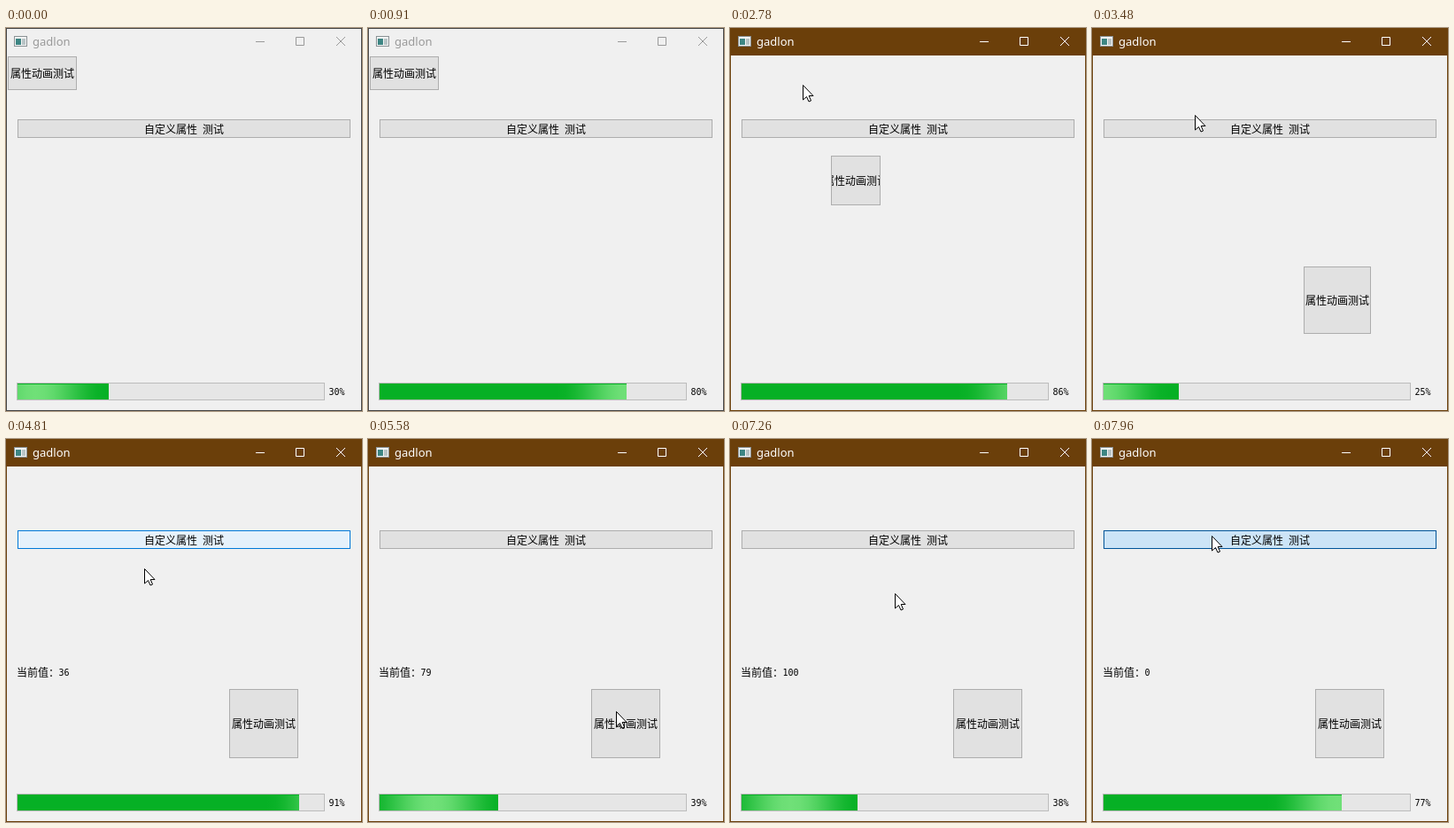
Animation of 402 by 432 pixels, one loop 8 s. Source, as an HTML page with a canvas:

```html
<!DOCTYPE html>
<html lang="zh">
<head>
<meta charset="utf-8">
<style>
  html, body { margin: 0; width: 100%; height: 100%; overflow: hidden; }
  canvas { display: block; }
</style>
</head>
<body>
<canvas id="stage" width="402" height="432"></canvas>
<script>
const ctx = document.getElementById('stage').getContext('2d');
const LOOP = 8000;
const CJK = '12px "Noto Sans CJK SC", "Noto Sans CJK", sans-serif';
const DIGITS = '10px "DejaVu Sans Mono", monospace';
const NORMAL = ['#e1e1e1', '#adadad'];
const HOVER = ['#e5f1fb', '#0078d7'];
const PRESSED = ['#cce4f7', '#005499'];
const ARROW = new Path2D('M0 0V16.5L4 13L6.5 18.5L9 17.5L6.7 12H11.5Z');

// Times at which the progress bar starts over
const passStarts = [-448, 1440, 3110, 5065, 6712, 8521];
// Stops of the mouse pointer: [time, x, y]
const pointerStops = [
  [1450, 230, 205], [1870, 74, 55], [2500, 74, 55], [3480, 116, 98], [3700, 118, 104],
  [4600, 124, 106], [4810, 156, 146], [5060, 270, 300], [6420, 302, 322], [7750, 135, 109]
];
// Mouse presses: [down, up]
const clicks = { move: [1990, 2150], count: [3850, 4000], restart: [7750, 7890] };

const clamp = (v, max = 1) => Math.max(0, Math.min(max, v));
const smooth = f => f * f * (3 - 2 * f);
const within = (t, [from, to]) => t >= from && t < to;

function stepTime(t) {
  if (t < 910) return Math.floor(t / 70) * 70;
  if (t < 1040) return 910;
  return Math.max(1040, 1730 + Math.floor((t - 1730) / 70) * 70);
}

function box(x, y, w, h, [fill, border]) {
  ctx.fillStyle = border;
  ctx.fillRect(x, y, w, h);
  ctx.fillStyle = fill;
  ctx.fillRect(x + 1, y + 1, w - 2, h - 2);
}

function text(string, x, y, font, color = '#000', align = 'left') {
  ctx.font = font;
  ctx.fillStyle = color;
  ctx.textAlign = align;
  ctx.fillText(string, x, y);
}

function button(label, x, y, w, h, colors) {
  box(x, y, w, h, colors);
  ctx.save();
  ctx.beginPath();
  ctx.rect(x + 1, y + 1, w - 2, h - 2);
  ctx.clip();
  text(label, x + w / 2, Math.round(y + h / 2) + 5, CJK, '#000', 'center');
  ctx.restore();
}

function drawWindow(active) {
  const frame = active ? '#6b3f0a' : '#444';
  const ink = active ? '#fff' : '#999';
  box(0, 0, 402, 432, ['#f0f0f0', frame]);
  if (active) ctx.fillStyle = frame;
  ctx.fillRect(1, 1, 400, 30);

  box(9, 9, 15, 12, ['#f4f4f4', '#8b9295']);
  ctx.fillStyle = '#3d8583';
  ctx.fillRect(11, 12, 6, 7);
  ctx.fillStyle = '#b8c4c6';
  ctx.fillRect(18, 12, 4, 7);
  text('gadlon', 30, 20, '13px "Noto Sans", sans-serif', ink);

  ctx.strokeStyle = ink;
  ctx.lineWidth = 1;
  ctx.stroke(new Path2D('M282 15.5h10M327.5 10.5h9v9h-9zM373 10l10 10M383 10l-10 10'));
}

// Green chunk colour, from plain (0) to fully lit (1)
const green = lit => `rgb(${6 + 106 * lit}, ${176 + 48 * lit}, ${37 + 83 * lit})`;

function drawProgress(t) {
  const pass = passStarts.findLastIndex(start => start <= t);
  const start = passStarts[pass];
  const u = (t - start) / (passStarts[pass + 1] - start);
  const value = Math.floor(100 * (1.4 * u - .4 * u * u));
  const width = clamp(Math.round(3.53 * value - 3.2), 346);

  const center = 540 * u - 95;
  const glow = ctx.createLinearGradient(center - 80, 0, center + 80, 0);
  for (let i = 0; i <= 16; i++) glow.addColorStop(i / 16, green(Math.sin(Math.PI * i / 16) ** 2));

  box(12, 400, 348, 20, ['#e6e6e6', '#bcbcbc']);
  ctx.fillStyle = green(0);
  ctx.fillRect(13, 401, width, 18);
  ctx.fillStyle = glow;
  ctx.fillRect(13, 402, width, 17);
  text(value + '%', 364.5, 414, DIGITS);
}

function drawWideButton(t) {
  const pressed = within(t, clicks.count) || t >= clicks.restart[0];
  const hover = within(t, [1520, 1640]) || within(t, [3620, 4880]);
  button('自定义属性\u2002测试', 13, 103, 376, 21, pressed ? PRESSED : hover ? HOVER : NORMAL);
}

function drawMovingButton(t) {
  const label = '属性动画测试';
  const released = clicks.move[1];
  if (t <= released) {
    button(label, 2, 32, 78, 38, t >= 1800 ? HOVER : NORMAL);
    return;
  }
  const f = clamp((t - released) / 1400);
  const offset = Math.floor(250 * f);
  const size = Math.round(38 + 40 * f);
  button(label, 2 + offset, 32 + offset, size, size, NORMAL);
}

function drawCounter(t) {
  if (t < 4150) return;
  const value = t >= clicks.restart[1] ? 0 : clamp(Math.floor((t - 4150) / 18), 100);
  text('当前值：', 12, 268, CJK);
  text(value, 59.5, 267, DIGITS);
}

function pointerAt(t) {
  const i = pointerStops.findLastIndex(stop => stop[0] <= t);
  const [from, x, y] = pointerStops[i];
  const [to, nextX, nextY] = pointerStops[i + 1] || [LOOP, x, y];
  const f = smooth((t - from) / (to - from));
  return [Math.round(x + (nextX - x) * f), Math.round(y + (nextY - y) * f)];
}

function drawPointer(t) {
  if (t < pointerStops[0][0]) return;
  const [x, y] = pointerAt(t);
  if (Object.values(clicks).some(click => within(t, click))) {
    ctx.fillStyle = 'rgba(255, 255, 0, .5)';
    ctx.beginPath();
    ctx.arc(x, y, 12, 0, 2 * Math.PI);
    ctx.fill();
  }
  ctx.save();
  ctx.translate(x + .5, y + .5);
  ctx.fillStyle = '#fff';
  ctx.strokeStyle = '#000';
  ctx.fill(ARROW);
  ctx.stroke(ARROW);
  ctx.restore();
}

function render(now) {
  const t = stepTime(now % LOOP);
  drawWindow(t >= clicks.move[0]);
  drawProgress(t);
  drawWideButton(t);
  drawCounter(t);
  drawMovingButton(t);
  drawPointer(t);
  requestAnimationFrame(render);
}
requestAnimationFrame(render);
</script>
</body>
</html>
```
